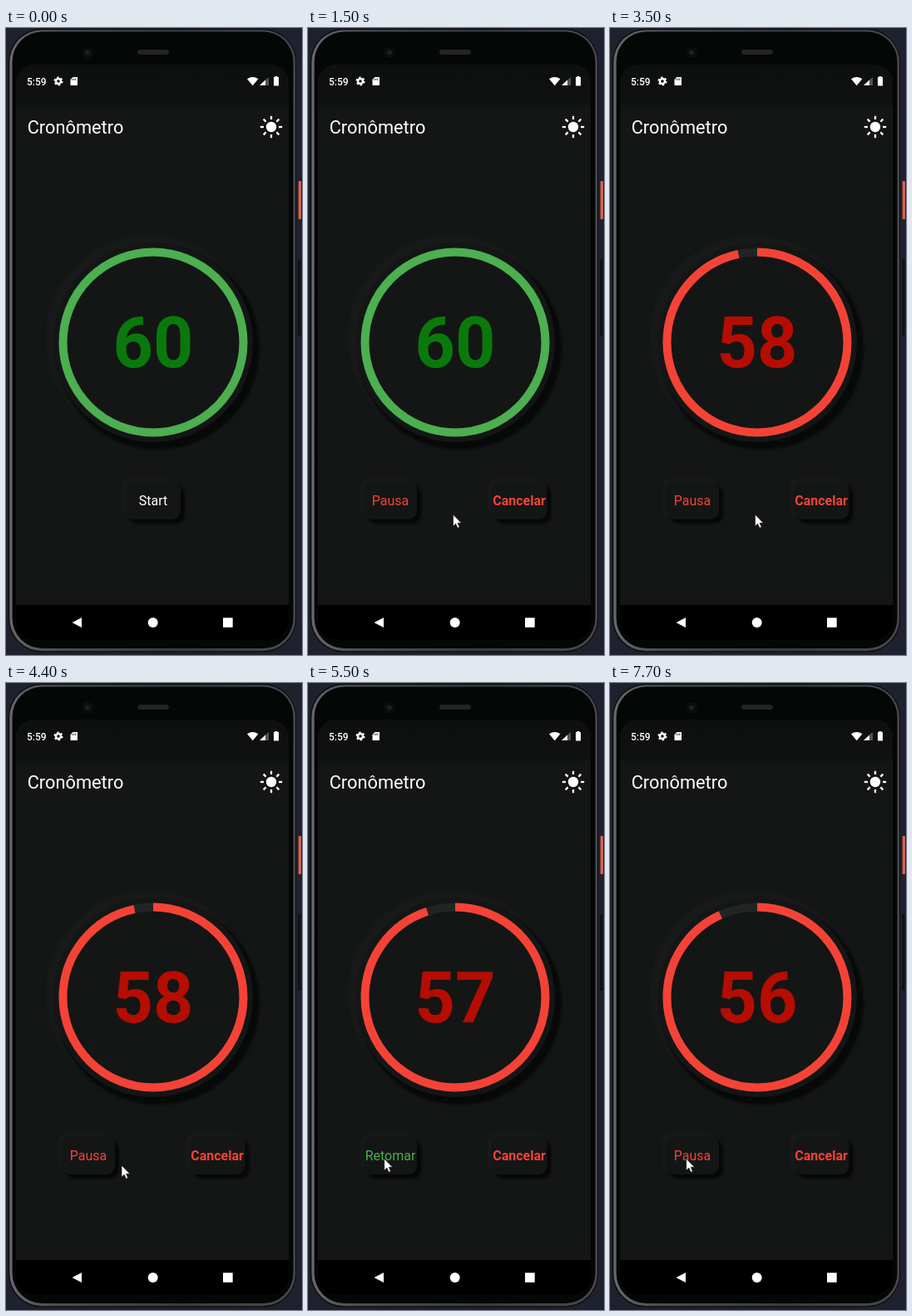
Animation, 356 px wide and 754 px high, one loop 8000 ms. Source, as an HTML page:

```html
<!DOCTYPE html>
<html lang="pt">
<head>
<meta charset="utf-8">
<title>Cronômetro</title>
<style>
  html, body { margin: 0; width: 100%; height: 100%; overflow: hidden; background: #20212e; }
  svg { display: block; width: 356px; height: 754px; font-family: Roboto, sans-serif; }
  .label { font-size: 16px; text-anchor: middle; }
  #count { font-size: 84.5px; font-weight: 700; text-anchor: middle; }
</style>
</head>
<body>
<svg viewBox="0 0 356 754">
  <defs>
    <linearGradient id="edge" x1="0" x2="1">
      <stop offset="0" stop-color="#66686a"/>
      <stop offset=".15" stop-color="#4c4e50"/>
      <stop offset=".6" stop-color="#3a3b3d"/>
      <stop offset="1" stop-color="#48494c"/>
    </linearGradient>
    <linearGradient id="bar" x1="0" x2="0" y1="0" y2="1">
      <stop offset="0" stop-color="#0e0f0f"/>
      <stop offset=".9" stop-color="#0f1010"/>
      <stop offset="1" stop-color="#141615"/>
    </linearGradient>
    <filter id="soft" x="-30%" y="-30%" width="160%" height="160%" color-interpolation-filters="sRGB">
      <feGaussianBlur stdDeviation="1.8"/>
    </filter>
    <clipPath id="screen"><rect x="12" y="44" width="328" height="692" rx="22"/></clipPath>
  </defs>

  <!-- phone body -->
  <rect width="356" height="754" fill="#20212e"/>
  <rect x="351.7" y="184" width="3.3" height="46" rx="1" fill="#d9634f"/>
  <rect x="351" y="278" width="3.5" height="92" rx="1" fill="#111216"/>
  <rect x="3" y="1" width="346" height="749.5" rx="40" fill="#0b0c0d"/>
  <rect x="4.3" y="2.2" width="343.7" height="747" rx="39" fill="url(#edge)"/>
  <rect x="7.6" y="4.4" width="337.9" height="741.6" rx="36" fill="#050606"/>
  <circle cx="98" cy="29.5" r="7" fill="#0c0d0e"/>
  <circle cx="98" cy="29.5" r="3" fill="#1c1f24"/>
  <rect x="158" y="26" width="38" height="6" rx="3" fill="#222426"/>

  <!-- app -->
  <g clip-path="url(#screen)">
    <rect x="12" y="44" width="328" height="692" fill="#141615"/>
    <rect x="12" y="44" width="328" height="52" fill="url(#bar)"/>
    <rect x="12" y="694" width="328" height="42" fill="#000"/>
  </g>

  <g fill="#fff">
    <text x="25" y="69" font-size="12" font-weight="500">5:59</text>
    <circle cx="63" cy="64" r="3" fill="none" stroke="#fff" stroke-width="2.4"/>
    <circle cx="63" cy="64" r="4.7" fill="none" stroke="#fff" stroke-width="1.6" stroke-dasharray="2.5 2.42"/>
    <path d="M80.5 59H86V69H77.5V62Z"/>
    <path d="M79.8 61v2M81.8 60.5v2.5M83.8 60.5v2.5" stroke="#111" stroke-width=".8"/>
    <path d="M290 61.3Q296.7 56.8 303.4 61.3L296.7 69.3Z"/>
    <path d="M316 59V69H305Z" fill="#555"/>
    <path d="M312 62.6V69H305Z"/>
    <path d="M323.5 59V58H326.5V59H328V69.5H322V59Z"/>
    <text x="25.7" y="126.5" font-size="21.8">Cronômetro</text>
    <circle cx="319" cy="119" r="6.2"/>
    <g id="rays" stroke="#fff" stroke-width="2.3"></g>
    <path d="M91 709V721L79.5 715Z"/>
    <circle cx="176.7" cy="715" r="6"/>
    <rect x="261" y="709.3" width="11.7" height="11.5" rx=".5"/>
  </g>

  <!-- dial -->
  <circle cx="172" cy="373" r="124" fill="#181a19" filter="url(#soft)"/>
  <circle cx="182.5" cy="384.5" r="122.5" fill="#070808" filter="url(#soft)"/>
  <circle cx="177" cy="378" r="120" fill="#141615"/>
  <circle cx="177" cy="378" r="108.5" fill="none" stroke="#222423" stroke-width="10"/>
  <circle id="ring" cx="177" cy="378" r="108.5" fill="none" stroke-width="10" pathLength="60" transform="rotate(-90 177 378)"/>
  <text id="count" x="177" y="407.5"></text>

  <!-- buttons -->
  <g id="idle"></g>
  <g id="active"></g>

  <path id="cursor" d="M0 0V14.2L3.2 11.2L5.4 16.3L7.8 15.3L5.6 10.3H10Z" fill="#fff" stroke="#111" stroke-width=".7"/>
</svg>
<script>
const LOOP = 8000;
const $ = id => document.getElementById(id);
const GREEN = '#4caf50', RED = '#f44336';

const box = (x, y, w, h, fill, blur) =>
  `<rect x="${x}" y="${y}" width="${w}" height="${h}" rx="11" fill="${fill}"${blur ? ' filter="url(#soft)"' : ''}/>`;

function button(cx, w, text, fill, weight, id) {
  const x = cx - w / 2;
  return box(x - 4, 541, w, 47, '#181a19', true)
    + box(x + 5, 550, w, 46, '#060707', true)
    + box(x, 545, w, 46, '#141615')
    + `<text id="${id}" class="label" x="${cx}" y="574" fill="${fill}" font-weight="${weight}">${text}</text>`;
}

$('idle').innerHTML = button(177, 66, 'Start', '#fff', 400, 'start');
$('active').innerHTML = button(99, 64, 'Pausa', RED, 400, 'pause')
  + button(254, 67, 'Cancelar', RED, 700, 'cancel');
$('rays').innerHTML = Array.from({ length: 8 }, (_, i) =>
  `<path d="M319 110V105.8" transform="rotate(${i * 45} 319 119)"/>`).join('');

// [time, value] steps, each held until the next
const counts = [[0, 60], [2600, 59], [3500, 58], [4500, 57], [7700, 56]];
const moves = [
  [600, [187, 717]], [700, [185, 671]], [800, [181, 627]], [900, [177, 598]], [1000, [174.5, 585]],
  [4400, [139, 580]], [4500, [102, 574]], [4600, [91.7, 572]]
];

const at = (steps, t) => steps.reduce((v, [time, value]) => t >= time ? value : v, null);

function draw(t) {
  const n = at(counts, t), full = n === 60;
  const running = t >= 1500, paused = t >= 5500 && t < 7700;
  const pos = at(moves, t);

  $('count').textContent = n;
  $('count').setAttribute('fill', full ? '#0a790c' : '#b50d02');
  $('ring').setAttribute('stroke', full ? GREEN : RED);
  $('ring').setAttribute('stroke-dasharray', full ? 'none' : `${n} 60`);

  $('idle').style.display = running ? 'none' : '';
  $('active').style.display = running ? '' : 'none';
  $('pause').textContent = paused ? 'Retomar' : 'Pausa';
  $('pause').setAttribute('fill', paused ? GREEN : RED);

  $('cursor').style.display = pos ? '' : 'none';
  if (pos) $('cursor').setAttribute('transform', `translate(${pos})`);
}

const begin = performance.now();
function tick() {
  draw((performance.now() - begin) % LOOP);
  requestAnimationFrame(tick);
}
tick();
</script>
</body>
</html>
```
